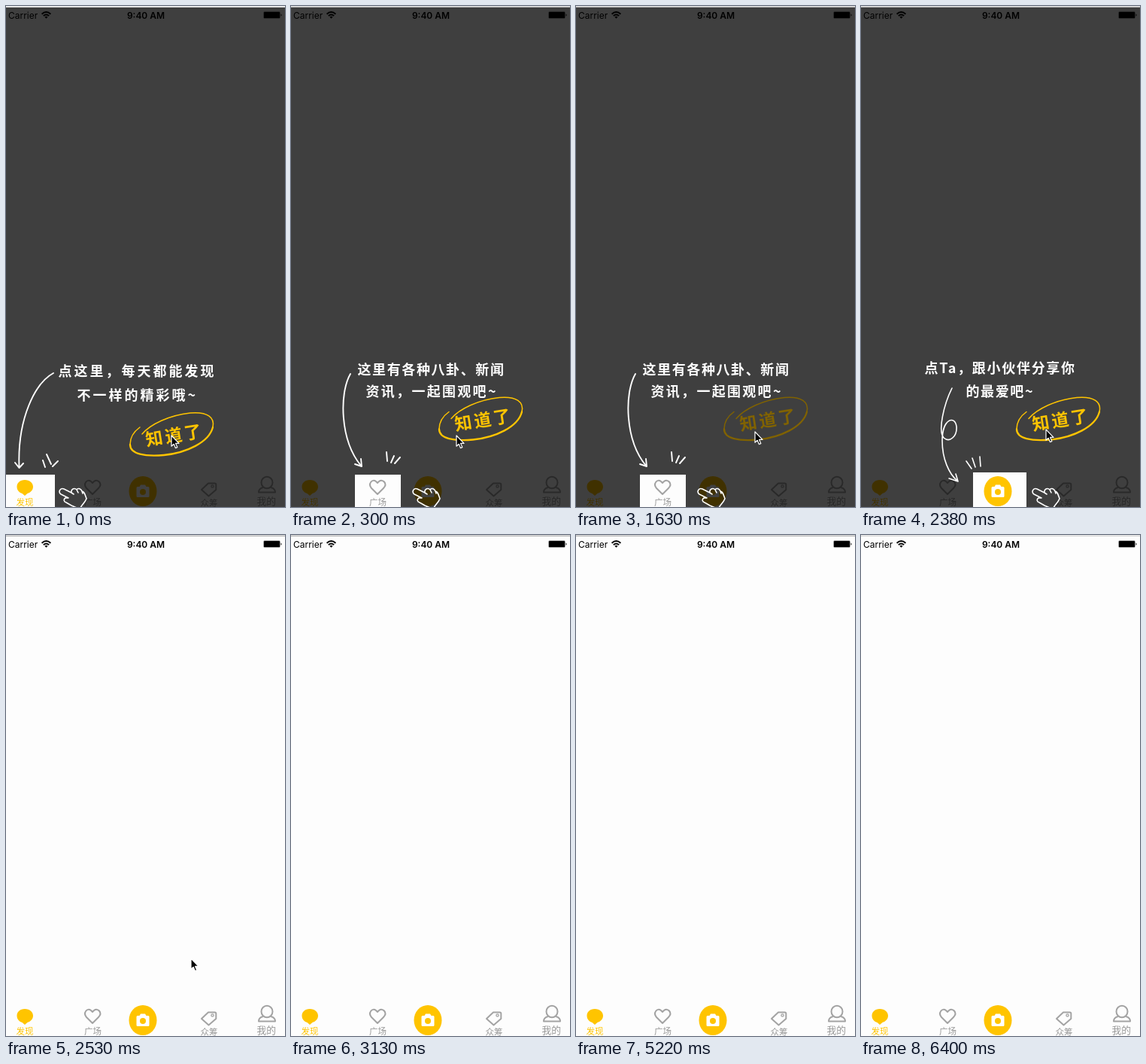
An HTML page that plays this animation: 371x666 px, repeating every 6.48 s.

```html
<!DOCTYPE html>
<html lang="zh-CN">
<head>
<meta charset="utf-8">
<title>Tab bar guide</title>
<style>
  html, body { margin: 0; width: 100%; height: 100%; overflow: hidden; background: #fdfdfd; }
  svg { display: block; width: 371px; height: 666px; }
  text { font-family: "Noto Sans CJK SC", "Noto Sans CJK", "Noto Sans CJK JP", sans-serif; }
  .status { font: 12px Inter, "Liberation Sans", sans-serif; }
  .clock { font-weight: 600; }
  .tab { font-size: 11.5px; fill: #999; }
  .line { fill: none; stroke: #a3a3a3; stroke-width: 2; stroke-linejoin: round; }
  .gold, .tab.gold { fill: #ffc400; }
  .dim { fill: #000; fill-opacity: .75; fill-rule: evenodd; }
  .note { font-size: 18px; font-weight: 700; fill: #fff; }
  .ink { fill: none; stroke: #fff; stroke-width: 1.9; stroke-linecap: round; stroke-linejoin: round; }
  .thin { stroke-width: 1.6; }
  .ring { fill: none; stroke: #ffc400; stroke-linecap: round; }
  .ok { font-size: 23px; font-weight: 700; letter-spacing: 3px; fill: #ffc400; }

  .step, .press, #edge, #cursor { animation: 6480ms step-end infinite; }
  .step { visibility: hidden; }
  #step1 { animation-name: step1; }
  #step2 { animation-name: step2; }
  #step3 { animation-name: step3; }
  #step1 .press { animation-name: press1; }
  #step2 .press { animation-name: press2; }
  #edge { animation-name: edge; }
  #cursor { animation-name: cursor; }

  @keyframes step1 { 0% { visibility: visible } 4.62%, 100% { visibility: hidden } }
  @keyframes step2 { 0% { visibility: hidden } 4.62% { visibility: visible } 27.46%, 100% { visibility: hidden } }
  @keyframes step3 { 0% { visibility: hidden } 27.46% { visibility: visible } 39.04%, 100% { visibility: hidden } }
  @keyframes press1 { 0% { filter: none } 2.31%, 100% { filter: brightness(.5) } }
  @keyframes press2 { 0% { filter: none } 25.15%, 100% { filter: brightness(.5) } }
  @keyframes edge { 0% { opacity: .55 } 2.31% { opacity: 1 } 98.76%, 100% { opacity: .55 } }
  @keyframes cursor {
    0% { transform: translate(220px, 571px); visibility: visible }
    9.25% { transform: translate(221px, 572px) }
    11.41% { transform: translate(230px, 570px) }
    16.04% { transform: translate(232px, 569px) }
    18.36% { transform: translate(236px, 568px) }
    20.52% { transform: translate(238px, 566px) }
    32.09% { transform: translate(243px, 564px) }
    34.41% { transform: translate(245px, 564px) }
    36.72% { transform: translate(246px, 563px) }
    45.98% { transform: translate(256px, 621px); visibility: visible }
    48.3% { transform: translate(256px, 621px); visibility: hidden }
    66.82% { transform: translate(339px, 644px); visibility: visible }
    69.13% { transform: translate(310px, 646px) }
    71.45% { transform: translate(263px, 645px) }
    73.61% { transform: translate(267px, 643px) }
    75.92% { transform: translate(270px, 643px) }
    78.24% { transform: translate(271px, 643px); visibility: visible }
    80.55%, 100% { transform: translate(271px, 643px); visibility: hidden }
  }
</style>
</head>
<body>
<svg viewBox="0 0 371 666">
  <defs>
    <g id="button">
      <path class="ring" stroke-width="1.5" d="M181 569C192 556 217 544 245 541C268 539 278 547 275 560"/>
      <path class="ring" stroke-width="2.3" d="M275 560C270 580 240 594 210 597C185 599 165 596 165 583"/>
      <path class="ring" stroke-width="1.5" d="M165 583C165 573 171 565 178 560"/>
      <text class="ok" transform="translate(187 585) rotate(-9)">知道了</text>
    </g>
    <path id="hand" class="ink thin" d="M83 654L73 649C69 646 72 640 77 642L87 647C86 642 91 640 94 643C96 640 100 642 101 645C104 645 105 649 107 655C105 660 101 663 99 667M87 647L90 649M94 643L96 647M101 645L102 648M83 654L79 654C76 656 77 659 80 660L87 664L94 667"/>
  </defs>

  <!-- status bar -->
  <text class="status" x="3" y="17">Carrier</text>
  <g fill="none" stroke="#000" stroke-width="1.9">
    <path d="M47.6 10.7Q53.5 5.2 59.4 10.7M49.8 13.1Q53.5 9.7 57.2 13.1"/>
    <path fill="#000" stroke="none" d="M51.4 14.6Q53.5 12.8 55.6 14.6L53.5 16.8Z"/>
  </g>
  <text class="status clock" x="186" y="17" text-anchor="middle">9:40 AM</text>
  <rect x="342.5" y="7.5" width="22" height="9" rx="1.5" fill="none" stroke="#aaa"/>
  <rect x="343" y="8" width="21" height="8" rx=".5"/>
  <path d="M365.5 10.2Q367.6 12 365.5 13.8Z"/>

  <!-- tab bar -->
  <path class="gold" d="M25 630C31.500 630 36 634 36 639C36 644 32 647 28.500 648L25 651L21.500 648C18 647 14.500 644 14.500 639C14.500 634 18.500 630 25 630Z"/>
  <text class="tab gold" x="13.500" y="664">发现</text>
  <path class="line" d="M115 649L107 641C102 635 108 628 113 632L115 634L117 632C122 628 129 635 123 641Z"/>
  <text class="tab" x="104" y="664">广场</text>
  <ellipse class="gold" cx="182" cy="645" rx="18.500" ry="20"/>
  <path fill="#fff" d="M174.500 639H177.500L179 636.500H185L186.500 639H189Q190.500 639 190.500 640.500V651.500Q190.500 653 189 653H175Q173.500 653 173.500 651.500V640.500Q173.500 639 175 639Z"/>
  <circle class="gold" cx="182" cy="646" r="4"/>
  <path class="line" d="M260 643L269 634.500H277.500Q279.300 634.500 279.300 636V643L269.500 651.500Z"/>
  <circle class="line" cx="274.500" cy="638.500" r="1.600" style="stroke-width:1.3"/>
  <text class="tab" x="258.500" y="665">众筹</text>
  <ellipse class="line" cx="347" cy="633.500" rx="7.500" ry="7.700"/>
  <path class="line" d="M342 640C338 641 336 643 336 646.500H358C358 643 356 641 352 640"/>
  <text class="tab" style="font-size:12.800px" x="333.500" y="662.500">我的</text>

  <!-- guide steps -->
  <g id="step1" class="step">
    <path class="dim" d="M0 2H371V666H0ZM0 623H65V666H0Z"/>
    <text class="note" letter-spacing="3" x="69.500" y="491.500">点这里，每天都能发现</text>
    <text class="note" letter-spacing="3" x="94.500" y="523.500">不一样的精彩哦~</text>
    <path class="ink" d="M63 488C39 501 15 548 17.500 613M12 607L17.500 614L23 608M49 604L52 613M54 596L60 609M69 605L62 612"/>
    <use href="#hand"/>
    <g class="press"><use href="#button"/></g>
  </g>
  <g id="step2" class="step">
    <path class="dim" d="M0 2H371V666H0ZM85 623H146V666H85Z"/>
    <text class="note" letter-spacing="1.600" x="88.500" y="489.500">这里有各种八卦、新闻</text>
    <text class="note" letter-spacing="2.300" x="99.500" y="518.500">资讯，一起围观吧~</text>
    <path class="ink" d="M79 489C64 515 65 577 93 611M85 609L94 612L93 602M127 593L128 605M137 598L133 607M145 600L138 608"/>
    <use href="#hand" x="91"/>
    <g class="press"><use href="#button" x="32" y="-20.500"/></g>
  </g>
  <g id="step3" class="step">
    <path class="dim" d="M0 2H371V666H0ZM149 620H220V666H149Z"/>
    <text class="note" letter-spacing="1.700" x="84.500" y="487.500">点Ta，跟小伙伴分享你</text>
    <text class="note" letter-spacing="1.600" x="139.500" y="518.500">的最爱吧~</text>
    <path class="ink thin" d="M121 508C110 530 102 565 110 574C118 581 128 572 127 559C125 544 108 548 108 578C108 602 117 622 128 631M117 628L129 632L126 622M140 605L147 615M148 601L152 613M158 599L159 612"/>
    <use href="#hand" x="157"/>
    <g class="press"><use href="#button" x="42" y="-20.500"/></g>
  </g>

  <rect width="371" height="2" fill="#fff"/>
  <g id="edge">
    <rect width="371" height="1" fill="#dedede"/>
    <rect y="1" width="371" height="1" fill="#b8b8b8"/>
  </g>
  <path id="cursor" stroke="#fff" stroke-width="1.200" stroke-linejoin="round" d="M0 0V14.200L3.200 11.300L5.400 16.600L7.800 15.600L5.600 10.400H10Z"/>
</svg>
</body>
</html>
```
